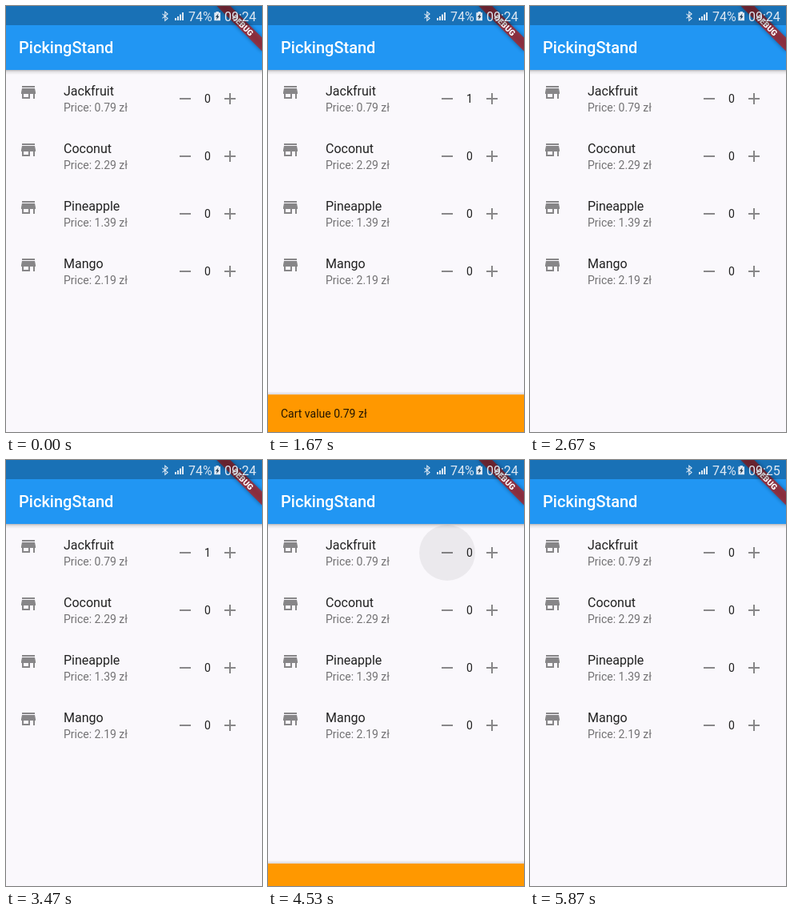
Animation of 320x533 px, one loop 6540 ms. Source, as an HTML page:

```html
<!DOCTYPE html>
<html lang="en">
<head>
<meta charset="utf-8">
<title>PickingStand</title>
<style>
  html, body { margin: 0; width: 100%; height: 100%; overflow: hidden; background: #faf8fc; }
  svg { display: block; width: 100vw; height: 100vh; }
  text { font-family: Roboto, "Noto Sans", sans-serif; white-space: pre; }
  .name { font-size: 16px; fill: #212121; }
  .price { font-size: 14px; fill: #000; fill-opacity: .54; }
  .count { font-size: 14px; fill: #212121; text-anchor: middle; }
  .icon { fill: #000; fill-opacity: .46; }
  .status { fill: #dfe9f3; }
  .status text { font-size: 16px; }
</style>
</head>
<body>
<svg viewBox="0 0 320 533" preserveAspectRatio="none">
  <defs>
    <linearGradient id="drop" x2="0" y2="1">
      <stop offset="0" stop-color="#000" stop-opacity=".26"/>
      <stop offset=".4" stop-color="#000" stop-opacity=".09"/>
      <stop offset="1" stop-color="#000" stop-opacity="0"/>
    </linearGradient>
    <linearGradient id="rise" x2="0" y2="1">
      <stop offset="0" stop-color="#000" stop-opacity="0"/>
      <stop offset="1" stop-color="#000" stop-opacity=".13"/>
    </linearGradient>
    <filter id="soft" x="-20%" y="-100%" width="140%" height="300%">
      <feGaussianBlur stdDeviation="2.5"/>
    </filter>
  </defs>

  <rect width="320" height="533" fill="#faf8fc"/>
  <circle id="ripple" cx="224" cy="116" r="35" opacity="0"/>
  <g id="rows"></g>

  <rect y="80" width="320" height="6" fill="url(#drop)"/>
  <rect width="320" height="80" fill="#2196f3"/>
  <text x="16" y="59.3" font-size="20" font-weight="500" fill="#fff">PickingStand</text>

  <g id="bar">
    <rect y="-4" width="320" height="4" fill="url(#rise)"/>
    <rect width="320" height="50" fill="#ff9800"/>
    <text id="total" x="16" y="29" font-size="14" fill="#000" fill-opacity=".87">Cart value 0.79 zł</text>
  </g>

  <g transform="translate(320 0) rotate(45)">
    <rect x="-40" y="28" width="80" height="12" opacity=".4" filter="url(#soft)"/>
    <rect x="-40" y="28" width="80" height="12" fill="#b71c1c" fill-opacity=".72"/>
    <text y="37.6" font-size="10.2" font-weight="900" fill="#fff" text-anchor="middle">DEBUG</text>
  </g>

  <rect width="320" height="24" fill-opacity=".25"/>
  <g class="status">
    <path d="M195.5 9.8l6.6 5.6-3.3 2.9V7.2l3.3 2.8-6.6 5.4" fill="none" stroke="#dfe9f3" stroke-width="1.1"/>
    <path d="M211 15h2v3h-2zM214 13h2v5h-2zM217 10.500h2v7.500h-2zM220 8h2v10h-2z"/>
    <text x="228" y="18.500">74%</text>
    <path d="M262.500 7h3.500v1.300h2v9.900h-7.700V8.300h2.200z"/>
    <path d="M265.500 9.500l-3.600 4.300h2l-1 3.400 3.700-4.500h-2.100z" fill="#17324a"/>
    <text id="clock" x="273" y="18.500">09:24</text>
  </g>
</svg>
<script>
const $ = id => document.getElementById(id);
const LOOP = 6540, STEP = 1000 / 15, BAR = 48;
const STORE = "M20 4H4v2h16V4zm1 10v-2l-1-5H4l-1 5v2h1v6h10v-6h4v6h2v-6h1zm-9 4H6v-4h6v4z";
const goods = [["Jackfruit", "0.79"], ["Coconut", "2.29"], ["Pineapple", "1.39"], ["Mango", "2.19"]];

// Item added at `on`, removed at `off`; `lag` is how far the exit has run by then.
const visits = [
  { on: 1466, off: 2466, lag: 84, tint: .04 },
  { on: 3466, off: 4533, lag: 79, tint: .06 }
];

$("rows").innerHTML = goods.map(([name, price], i) => `
  <g transform="translate(0 ${i * 72})">
    <path class="icon" transform="translate(16 96)" d="${STORE}"/>
    <text class="name" x="72" y="112">${name}</text>
    <text class="price" x="72" y="132">Price: ${price} zł</text>
    <path class="icon" d="M217 115h14v2h-14z"/>
    <text class="count" x="252" y="121">0</text>
    <path class="icon" d="M279 109h2v6h6v2h-6v6h-2v-6h-6v-2h6z"/>
  </g>`).join("");
const count = document.querySelector(".count");

const clamp = v => Math.min(1, Math.max(0, v));

// cubic-bezier(.4, 0, .2, 1)
function ease(x) {
  if (x <= 0 || x >= 1) return clamp(x);
  let lo = 0, hi = 1, s = .5;
  for (let i = 0; i < 20; i++) {
    s = (lo + hi) / 2;
    const r = 1 - s;
    if (1.2 * r * r * s + .6 * r * s * s + s * s * s < x) lo = s; else hi = s;
  }
  return s * s * (3 - 2 * s);
}

function draw(time) {
  const t = Math.floor(time / STEP + .06) * STEP;
  let height = 0, fade = 0, amount = 0, tint = 0;
  for (const v of visits) {
    if (t < v.on) continue;
    if (t < v.off) {
      const p = clamp((t - v.on) / 250);
      amount = 1;
      height = BAR * ease(p);
      fade = ease((p - .4) / .45);
    } else {
      amount = 0;
      fade = 0;
      height = BAR * (1 - ease((t - v.off + v.lag) / 250));
      tint = v.tint * clamp(1 - (t - v.off) / 130);
    }
  }
  count.textContent = amount;
  $("bar").setAttribute("transform", `translate(0 ${(533 - height).toFixed(2)})`);
  $("bar").setAttribute("visibility", height > .2 ? "visible" : "hidden");
  $("total").setAttribute("opacity", fade);
  $("ripple").setAttribute("opacity", tint);
  $("clock").textContent = t < 5866 ? "09:24" : "09:25";
}

const start = performance.now();
function tick() {
  draw((performance.now() - start) % LOOP);
  requestAnimationFrame(tick);
}
tick();
</script>
</body>
</html>
```
